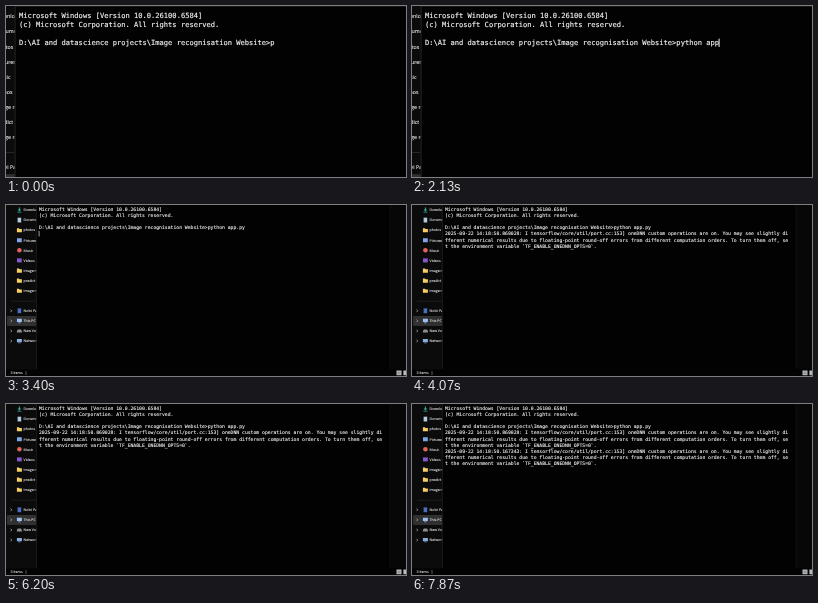
An HTML page that plays this animation: 400x171 px, repeating every 8 s.

```html
<!DOCTYPE html>
<html lang="en">
<head>
<meta charset="utf-8">
<title>Terminal session</title>
<style>
  html, body { margin: 0; width: 100%; height: 100%; overflow: hidden; background: #020202; }
  svg { display: block; width: 100vw; height: 100vh; }
  text { white-space: pre; text-rendering: geometricPrecision; }
  #lines text { font: 4.75px "DejaVu Sans Mono", monospace; fill: #f4f4f4; stroke: #f4f4f4; stroke-width: .12px; }
  #side text, #status text { font: 3.55px "Open Sans", "Noto Sans", sans-serif; fill: #f0f0f0; stroke: #f0f0f0; stroke-width: .08px; }
</style>
</head>
<body>
<svg viewBox="0 0 400 171" preserveAspectRatio="none">
  <g id="scene">
    <rect x="-10" y="-10" width="420" height="190" fill="#0b0b0b"/>
    <g id="side"><path d="M5 96.2h25" stroke="#2c2c2c" stroke-width=".6"/></g>
    <rect x="30.2" y="-10" width="370" height="190" fill="#020202"/>
    <rect x="30.2" y="-10" width="354" height="8.5" fill="#1c1c1c"/>
    <path d="M30.4-10V164" stroke="#2a2a2a" stroke-width=".6"/>
    <g id="status">
      <rect x="384" width="16" height="164" fill="#070707"/>
      <path d="M384 0V164" stroke="#181818" stroke-width=".6"/>
      <rect y="164.5" width="400" height="6.5" fill="#030303"/>
      <text x="4.5" y="169.4">3 items</text>
      <path d="M20 166.2v3.8" stroke="#999" stroke-width=".6"/>
      <path d="M390.5 165.6h5v4.6h-5zM397.4 165.6h2.6v4.6h-2.6z" fill="#b9bcc0"/>
      <path d="M391.5 167.2h3M391.5 168.7h3" stroke="#555" stroke-width=".5"/>
    </g>
    <g id="lines"></g>
    <rect id="caret" width=".7" height="5.6" fill="#e6e6e6"/>
  </g>
  <path id="mouse" d="M295.3 37.8v7.3l1.7-1.6 1.1 2.5 1.2-.5-1.1-2.4h2.2z" fill="#fff" stroke="#000" stroke-width=".4"/>
</svg>
<script>
const LOOP = 8000, CUT = 3400;
const LEFT = 33, CHAR = 2.86, PITCH = 6.04, BASE = 6.3;
const ZOOM = "matrix(1.49 0 0 1.49 -36.2 3.1)";
const $ = id => document.getElementById(id);

function add(parent, tag, attrs, content) {
  const el = document.createElementNS("http://www.w3.org/2000/svg", tag);
  for (const key in attrs) el.setAttribute(key, attrs[key]);
  if (content) el.textContent = content;
  parent.appendChild(el);
  return el;
}

// Sidebar: label, icon shape, colour
const shapes = {
  folder: "M-2.5-2h2l.7.8h2.3v3.4h-5z",
  page: "M-1.8-2.4h3.6v4.8h-3.6z",
  arrow: "M-.5-2.4h1v2h1.3l-1.8 1.8-1.8-1.8h1.3zM-2 1.7h4v.7h-4z",
  picture: "M-2.4-2h4.8v4h-4.8z",
  disc: "M-2.3 0a2.3 2.3 0 1 0 4.6 0a2.3 2.3 0 1 0-4.6 0",
  screen: "M-2.5-2.1h5v3.2h-5zM-1.2 1.6h2.4v.7h-2.4z",
  drive: "M-2.5 0l1-1.5h3l1 1.5v1.6h-5z"
};
const places = [
  ["Downloads", "arrow", "#36b3a0"], ["Documents", "page", "#b4c9da"],
  ["photos", "folder", "#f7cf62"], ["Pictures", "picture", "#7fa6ea"],
  ["Music", "disc", "#e2655a"], ["Videos", "picture", "#8657cf"],
  ["image rec", "folder", "#f7cf62"], ["predict", "folder", "#f7cf62"],
  ["image rec", "folder", "#f7cf62"], null,
  ["Nolvi Pad", "page", "#4b6fc4"], ["This PC", "screen", "#9cc0ee"],
  ["New Volume", "drive", "#8a8f96"], ["Network", "screen", "#86aee0"]
];
places.forEach((place, i) => {
  if (!place) return;
  const side = $("side"), [label, shape, fill] = place, y = 5 + i * 10.08;
  if (label === "This PC") add(side, "rect", { x: 1, y: y - 5, width: 30, height: 10, rx: 1, fill: "#303030" });
  if (i > 9) add(side, "path", { d: `M4.5 ${y - 1.3}l1.3 1.3-1.3 1.3`, fill: "none", stroke: "#ddd", "stroke-width": .6 });
  add(side, "path", { d: shapes[shape], fill, transform: `translate(13.4 ${y})` });
  add(side, "text", { x: 17.6, y: y + 1.3 }, label);
});

// Terminal
const prompt = "D:\\AI and datascience projects\\Image recognisation Website>";
const notice = time => [
  `2025-09-22 14:18:50.${time}: I tensorflow/core/util/port.cc:153] oneDNN custom operations are on. You may see slightly di`,
  "fferent numerical results due to floating-point round-off errors from different computation orders. To turn them off, se",
  "t the environment variable `TF_ENABLE_ONEDNN_OPTS=0`."
];
const output = [
  "Microsoft Windows [Version 10.0.26100.6584]",
  "(c) Microsoft Corporation. All rights reserved.",
  "", prompt, ...notice("869028"), ...notice("167343")
];
const rows = output.map((line, i) =>
  add($("lines"), "text", { x: LEFT, y: BASE + i * PITCH }, line));

const command = "python app.py";
const keyTimes = [0, 270, 330, 400, 530, 600, 670, 1930, 2070, 2130, 2470, 3000, 3070];
const blinks = [
  [270, 330], [1130, 1600], [2130, 2470], [2530, 2670], [3070, 3740],
  [4200, 4470], [5730, 5870], [6070, 6200], [7400, 7800]
];
const within = (t, [from, to]) => t >= from && t < to;

function draw(t) {
  const typed = keyTimes.filter(k => k <= t).length;
  const sent = t >= CUT;
  const last = t >= 6470 ? 10 : t >= 4070 ? 7 : 4;
  $("scene").setAttribute("transform", sent ? "" : ZOOM);
  rows[3].textContent = prompt + command.slice(0, typed);
  rows.forEach((row, i) => row.setAttribute("visibility", i < last ? "visible" : "hidden"));

  const row = sent ? last : 3;
  const col = sent ? 0 : prompt.length + typed;
  const caret = $("caret");
  caret.setAttribute("x", LEFT + col * CHAR - .3);
  caret.setAttribute("y", 1.7 + row * PITCH);
  caret.setAttribute("visibility", blinks.some(b => within(t, b)) ? "visible" : "hidden");
  $("mouse").setAttribute("visibility", within(t, [800, 1470]) ? "visible" : "hidden");
}

const start = performance.now();
function tick() {
  draw((performance.now() - start) % LOOP);
  requestAnimationFrame(tick);
}
tick();
</script>
</body>
</html>
```
